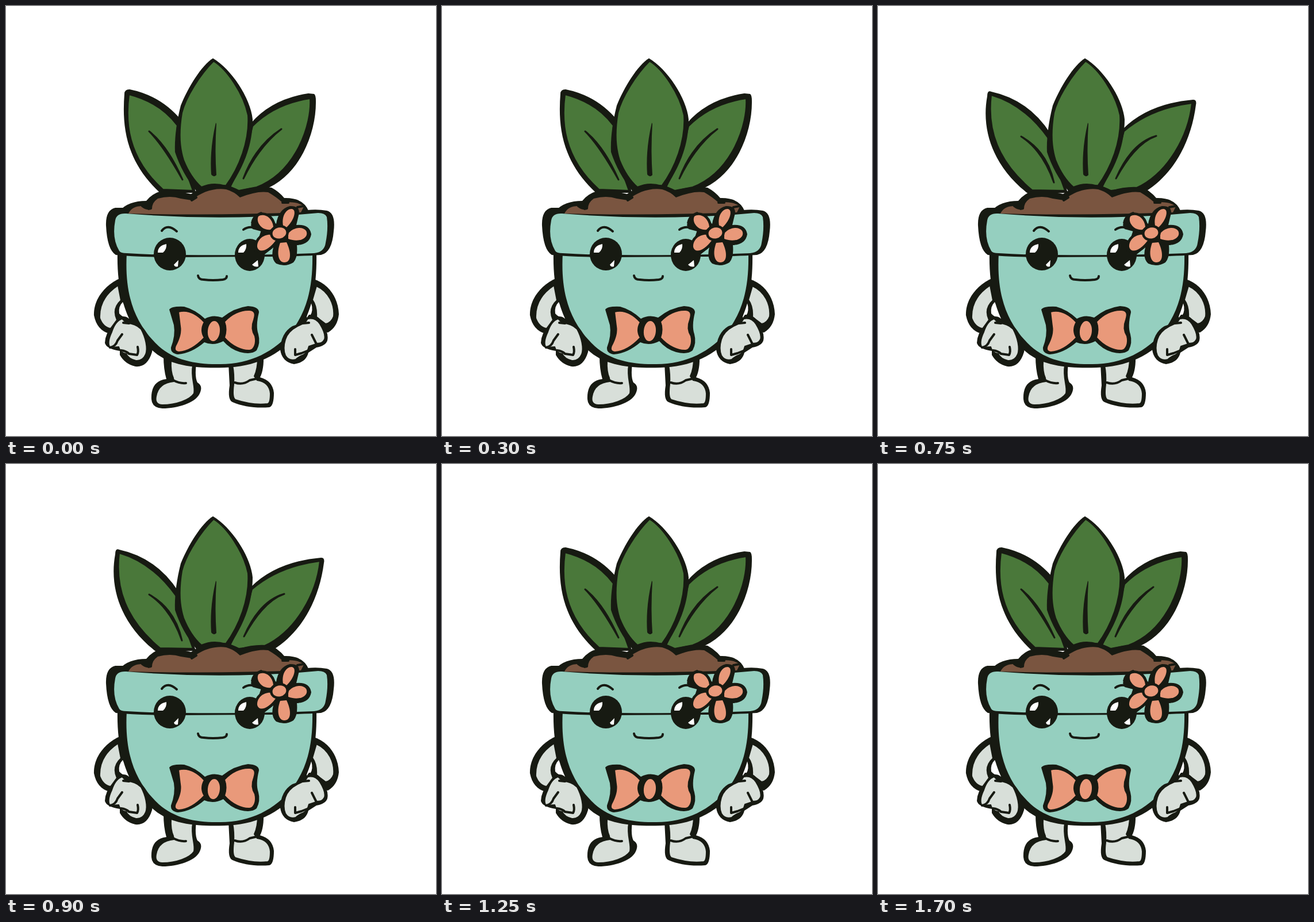
An HTML page for the animation above (2 s loop, 748x748 px).

```html
<!DOCTYPE html>
<html lang="en">
<head>
<meta charset="utf-8">
<title>Potted plant</title>
<style>
  html, body { margin: 0; width: 100%; height: 100%; overflow: hidden; background: #fff; }
  svg { display: block; width: 100vw; height: 100vh; }
  .ink { fill: #171a12; }
  .leaf { fill: #4a783a; }
  .pot { fill: #95cfbf; }
  .soil { fill: #7a5540; }
  .coral { fill: #e9997a; }
  .limb { fill: #d8dfd9; }
  .white { fill: #fff; }
  .leaf, .limb, .wing { stroke: #171a12; stroke-width: 2; }
  .line { fill: none; stroke: #171a12; stroke-width: 4; stroke-linecap: round; stroke-linejoin: round; }
  .petals { stroke: #171a12; stroke-width: 9; stroke-linejoin: round; paint-order: stroke; }
</style>
</head>
<body>
<svg viewBox="0 0 748 748">
  <g id="legs">
    <path class="ink" d="M274 608 Q274 632 279 649 C260 651 252 664 253 684 Q254 699 272 700 C300 700 328 690 336 676 Q344 661 333 655 Q328 645 331 622Z"/>
    <path class="limb" d="M287 617 Q286 636 291 647 L292 653 C275 655 264 662 261 679 Q258 693 272 694 C296 694 320 685 327 674 C330 661 321 648 325 625Z"/>
    <path class="line" d="M291 651 Q302 657 313 656"/>
    <path class="ink" d="M387 622 L389 660 Q385 685 394 689 C412 697 436 700 458 698 Q466 696 466 673 Q464 652 442 646 Q449 632 448 606Z"/>
    <path class="limb" d="M394 625 Q397 640 396 658 Q393 682 399 685 C417 691 437 694 455 692 Q460 691 460 674 Q458 654 437 651 L432 644 Q438 631 438 612Z"/>
    <path class="line" d="M398 655 Q412 660 424 651 L437 648"/>
  </g>

  <g id="arms">
    <path class="ink" d="M200 473 C170 486 152 512 153 538 Q158 564 180 570 L222 560 L214 490Z"/>
    <path class="limb" d="M195 486 C172 501 162 520 163 543 Q169 559 182 561 L193 546 C187 533 190 521 200 512Z"/>
    <path class="white" d="M203 515 Q195 523 197 535 Q202 541 213 544 L218 540Z"/>
    <path class="ink" d="M535 475 C563 484 578 509 579 536 Q577 558 560 568 L510 555 L523 490Z"/>
    <path class="limb" d="M540 487 C562 497 572 520 570 540 Q566 551 556 553 L540 541 C541 526 538 518 533 511Z"/>
    <path class="white" d="M531 517 Q523 530 523 542 L529 539 Q535 530 531 517Z"/>
  </g>

  <g id="body">
    <path class="ink" d="M194 428 C192 510 215 565 258 602 C290 629 338 630 380 629 C430 628 478 609 507 568 C535 530 541 480 540 428Z"/>
    <path class="pot" d="M210 430 C206 502 223 552 266 592 C294 617 333 624 373 623 C425 623 468 601 498 564 C526 526 534 484 533 430Z"/>
  </g>

  <g id="hands">
    <path class="ink" d="M204 540 Q213 540 216 548 C235 551 246 565 250 584 Q257 590 254 602 Q246 629 225 627 Q207 623 198 607 L198 600 Q174 596 172 586 Q173 568 185 558 Q192 542 204 540Z"/>
    <path class="limb" d="M202 544 L210 552 Q225 552 235 562 C243 577 247 595 243 606 Q238 618 226 617 Q213 614 209 605 Q199 604 196 593 L181 594 Q175 586 184 567 Q190 548 202 544Z"/>
    <path class="line" d="M181 594 Q191 592 194 582 L202 571 M204 551 L214 552 M200 599 Q209 600 214 605 L228 607 Q231 602 229 593"/>
    <path class="ink" d="M527 537 Q544 537 550 551 Q562 569 559 582 Q556 591 540 594 L526 603 Q522 620 501 623 Q480 619 477 598 Q478 569 498 557 L518 550Z"/>
    <path class="limb" d="M525 544 Q538 541 546 553 Q557 571 554 580 Q550 588 539 588 L527 592 Q524 604 517 607 Q509 610 504 615 Q492 618 486 608 Q481 596 486 580 Q490 566 507 557 L520 551Z"/>
    <path class="line" d="M516 552 L527 551 M532 572 L540 588 L552 587 M503 597 L503 607 L514 604 L524 600"/>
  </g>

  <g id="sideLeaves"></g>
  <g id="middleLeaf">
    <path class="ink" d="M360 91 C340 103 316 143 304 173 C296 205 293 232 294 254 Q306 291 332 323 L386 321 C408 287 429 250 429 197 C425 159 391 109 360 91Z"/>
    <path class="leaf" d="M361 96 C338 119 313 158 306 186 C300 222 303 250 309 268 Q321 298 340 315 Q360 306 382 313 C405 282 424 235 421 190 C413 152 384 110 361 96Z"/>
    <path class="ink" d="M365 203 Q354 250 357 293 Q361 299 366 294 Q363 250 366 205Z"/>
  </g>

  <g id="soil">
    <path class="ink" d="M198 356 Q213 339 244 339 Q260 319 288 320 L322 327 Q343 310 380 311 Q395 314 406 321 Q435 312 462 316 Q475 323 484 334 Q518 333 527 358 L520 369 H210Z"/>
    <path class="soil" d="M213 361 Q219 348 237 348 L248 355 L254 352 Q254 342 264 335 Q286 329 304 335 L323 338 C339 324 361 316 383 319 Q397 323 407 333 Q437 321 456 324 Q470 332 481 342 Q508 339 518 349 L513 359 Q362 365 213 361Z"/>
    <path class="line" d="M237 348 Q245 354 252 352 M323 338 L331 333 M481 342 L491 342 M507 350 L518 348"/>
  </g>

  <g id="rim">
    <path class="ink" d="M209 351 L190 351 Q173 355 174 382 Q176 424 191 433 Q230 437 300 437 L440 436 Q505 436 548 433 Q567 429 570 392 Q574 360 558 356 Q542 353 524 355 L520 364 Q362 372 209 361Z"/>
    <path class="pot" d="M209 361 Q192 360 190 373 Q184 405 197 426 Q199 430 210 430 Q260 433 310 433 Q440 434 536 430 Q554 428 556 412 Q561 387 558 367 Q555 360 543 360 L520 362 Q365 374 209 361Z"/>
  </g>

  <g id="face">
    <path class="line" d="M271 391 Q281 378 297 392 M413 389 Q424 381 439 388" stroke-width="5"/>
    <path class="ink" d="M426 381 Q432 363 444 362 L444 392 L429 388Z"/>
    <ellipse class="ink" cx="285" cy="431.500" rx="28" ry="28.500"/>
    <ellipse class="ink" cx="424" cy="433" rx="26" ry="28"/>
    <path class="white" d="M264 429 Q264 417 279 414 Q280 423 273 429Z M404 429 Q404 417 418 414 Q419 423 413 429Z"/>
    <path class="white" d="M300 442 L292 450 Q294 455 299 453Z M438 442 L428 450 Q433 455 439 453Z"/>
    <path class="line" d="M334 469 Q335 476 344 476 Q360 478 377 476 Q384 475 384 470"/>
  </g>

  <g id="flower">
    <path class="ink" d="M470 379 Q474 353 494 348 Q511 348 510 360 L505 381 Q528 379 531 397 Q528 415 506 416 Q508 437 500 446 Q486 455 470 448 Q460 439 465 420 L450 432 L432 427 L444 390 L426 378 Q428 363 444 358Z"/>
    <g class="coral petals">
      <path d="M465 384 C463 366 447 360 439 366 C434 376 445 391 460 389Z"/>
      <path d="M463 398 C448 396 436 407 437 419 C440 431 456 426 469 408Z"/>
      <path d="M477 412 C470 430 474 446 484 446 C496 446 497 430 488 411Z"/>
      <path d="M491 396 C498 386 515 382 522 391 C528 402 512 413 491 405Z"/>
      <path d="M482 382 C479 366 487 353 497 353 C506 354 502 372 488 385Z"/>
      <ellipse cx="475.500" cy="395" rx="12" ry="9.500" transform="rotate(-12 475 395)"/>
    </g>
  </g>

  <g id="bow">
    <path class="ink" d="M284 528 Q288 522 310 523 Q329 528 346 544 Q360 536 376 542 Q397 525 421 522 Q440 523 440 533 Q434 557 439 571 Q443 586 436 599 Q427 607 407 602 Q390 597 378 583 Q361 592 345 585 Q323 604 299 606 Q286 604 287 594 Q295 573 292 555Z"/>
    <path class="coral wing" d="M300 532 C318 527 334 538 345 550 Q337 564 345 577 C330 593 316 601 301 602 Q291 601 295 591 C301 580 305 568 303 557Z"/>
    <path class="coral wing" d="M380 549 C392 536 408 528 424 529 C434 530 434 537 431 546 C427 556 428 566 433 574 C436 586 432 598 424 599 C411 600 393 592 380 577 Q385 562 380 549Z"/>
    <ellipse class="ink" cx="361" cy="564" rx="20" ry="23"/>
    <ellipse class="coral" cx="361.500" cy="565.500" rx="10.500" ry="17.500" transform="rotate(5 361 565)"/>
  </g>
</svg>
<script>
  // Each leaf: outer edge, inner edge, then vein start, bend and end.
  const poses = [
    {
      left: ["M306 200 Q270 156 215 145 Q206 145 206 153 C202 205 206 268 268 325",
             "M298 208 Q268 168 214 154 C208 200 210 262 273 319", [249, 218, 277, 243, 307, 302]],
      right: ["M426 204 Q462 162 526 152 L536 153 Q539 155 539 165 C540 220 512 295 448 320",
              "M429 209 Q468 170 529 161 C532 205 505 288 436 315", [479, 214, 437, 243, 413, 300]]
    },
    {
      left: ["M304 212 Q266 155 207 146 Q199 147 199 155 C192 220 210 285 264 326",
             "M296 214 Q260 166 204 154 C200 215 214 275 270 320", [248, 223, 282, 243, 306, 307]],
      right: ["M426 208 Q468 164 534 153 Q541 153 541 160 C548 215 515 290 460 320",
              "M428 216 Q468 174 536 162 C538 205 510 285 440 315", [483, 218, 438, 240, 413, 301]]
    },
    {
      left: ["M300 222 Q262 163 197 149 Q190 146 190 157 C178 222 206 285 262 327",
             "M296 230 Q255 172 197 155 C190 215 208 270 268 320", [249, 227, 290, 252, 306, 307]],
      right: ["M426 214 Q470 170 548 163 Q555 163 553 172 C545 235 515 292 465 323",
              "M428 218 Q475 178 546 169 C540 225 505 290 450 316", [484, 226, 444, 238, 414, 300]]
    },
    {
      left: ["M304 200 Q262 158 203 147 Q197 147 196 157 C186 220 208 285 264 326",
             "M296 212 Q260 167 203 155 C198 215 210 272 268 320", [250, 222, 278, 245, 306, 311]],
      right: ["M426 208 Q475 166 540 154 Q546 156 546 165 C550 215 515 288 462 320",
              "M428 212 Q475 172 540 161 C545 205 510 285 444 315", [478, 226, 436, 246, 413, 298]]
    }
  ];
  const steps = [[0, 0], [500, 1], [750, 2], [1000, 3], [1250, 0]];
  const loop = 2000;
  const roots = {
    left: ["L330 325Z", "L325 321 L296 240Z"],
    right: ["L385 325Z", "L405 321 L390 315 L416 262Z"]
  };

  const shape = (kind, d) => `<path class="${kind}" d="${d}"/>`;

  function vein([x0, y0, cx, cy, x1, y1]) {
    return `M${x0} ${y0} Q${cx - 3} ${cy} ${x1} ${y1} Q${cx + 4} ${cy} ${x0} ${y0}Z`;
  }

  function leaf(side, [outer, inner, rib]) {
    const [outerRoot, innerRoot] = roots[side];
    return shape("ink", outer + outerRoot) + shape("leaf", inner + innerRoot) +
      `<path class="ink" stroke="#171a12" stroke-width="3" stroke-linejoin="round" d="${vein(rib)}"/>`;
  }

  const holder = document.getElementById("sideLeaves");
  holder.innerHTML = poses
    .map(pose => `<g>${leaf("left", pose.left)}${leaf("right", pose.right)}</g>`)
    .join("");
  const groups = [...holder.children];

  function draw() {
    const time = performance.now() % loop;
    const current = steps.filter(([start]) => start <= time).pop()[1];
    groups.forEach((group, i) => group.setAttribute("display", i === current ? "inline" : "none"));
    requestAnimationFrame(draw);
  }
  draw();
</script>
</body>
</html>
```
